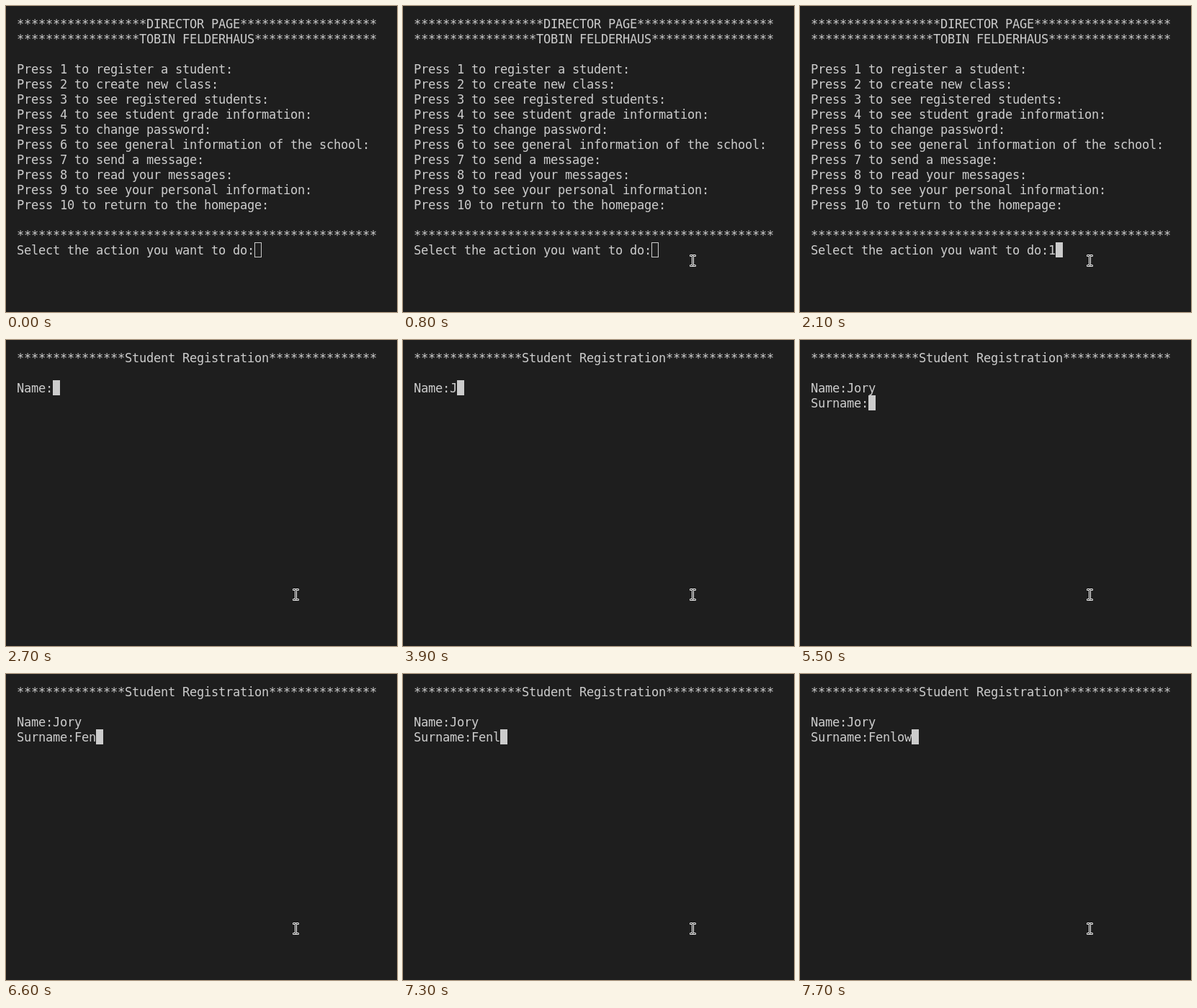
These frames come from a looping animation (543 px wide and 426 px high, 8000 ms). An HTML page:

```html
<!DOCTYPE html>
<html lang="en">
<head>
<meta charset="utf-8">
<title>Terminal session</title>
<style>
  html, body { margin: 0; width: 100%; height: 100%; overflow: hidden; background: #1e1e1e; }
  #screen {
    position: absolute; left: 15px; top: 15px; margin: 0;
    font: 17px/21px "DejaVu Sans Mono", monospace;
    letter-spacing: calc(10px - 1ch);
    color: #ccc; white-space: pre;
  }
  #caret {
    position: absolute; box-sizing: border-box; width: 10px; height: 21px;
    border: 1px solid #ccc;
  }
  #caret.focused { background: #ccc; }
  #pointer { position: absolute; left: 0; top: 0; width: 11px; height: 17px; }
</style>
</head>
<body>
<pre id="screen"></pre>
<div id="caret"></div>
<svg id="pointer" viewBox="0 0 11 17" fill="none">
  <defs>
    <path id="beam" d="M2.5 1.5H4.5L5.5 2.5L6.5 1.5H8.5M2.5 15.5H4.5L5.5 14.5L6.5 15.5H8.5M5.5 2.5V14.5"/>
  </defs>
  <use href="#beam" stroke="#fff" stroke-width="3" stroke-linecap="round" stroke-linejoin="round"/>
  <use href="#beam" stroke="#111" stroke-linecap="square"/>
</svg>
<script>
const LOOP = 8000, CELL_W = 10, CELL_H = 21, LEFT = 15, TOP = 14;
const COLS = 50, FOCUS_AT = 1000;
const screen = document.getElementById('screen');
const caret = document.getElementById('caret');
const pointer = document.getElementById('pointer');

const stars = n => '*'.repeat(n);
const banner = title => {
  const left = Math.floor((COLS - title.length) / 2);
  return stars(left) + title + stars(COLS - left - title.length);
};

const actions = [
  'register a student', 'create new class', 'see registered students',
  'see student grade information', 'change password',
  'see general information of the school', 'send a message',
  'read your messages', 'see your personal information',
  'return to the homepage'
];
const menu = [
  banner('DIRECTOR PAGE'),
  banner('TOBIN FELDERHAUS'),
  '',
  ...actions.map((a, i) => `Press ${i + 1} to ${a}:`),
  '',
  stars(COLS),
  'Select the action you want to do:'
].join('\n');
const form = banner('Student Registration') + '\n\nName:';
const NAME = 'Jory', SURNAME = 'Fenlow';
const named = form + NAME + '\nSurname:';

// [start time, screen text]; the caret always sits after the last character
const typed = (base, word, keys) => keys.map(([t, n]) => [t, base + word.slice(0, n)]);
const screens = [
  [0, menu],
  [2100, menu + '1'],
  [2700, form],
  ...typed(form, NAME, [[3900, 1], [4500, 3], [4800, 4]]),
  [5500, named],
  ...typed(named, SURNAME, [[6200, 1], [6400, 2], [6600, 3], [7300, 4], [7400, 5], [7700, 6]])
];

// [start time, centre x, centre y]
const moves = [
  [300, 236, 325], [400, 330, 338], [500, 420, 352],
  [600, 461, 359], [700, 430, 357], [800, 403, 354]
];

const current = (list, t) => list.filter(step => step[0] <= t).pop();
let shown = '';

function draw(t) {
  const text = current(screens, t)[1];
  if (text !== shown) {
    screen.textContent = shown = text;
    const lines = text.split('\n');
    caret.style.left = LEFT + CELL_W * lines[lines.length - 1].length + 'px';
    caret.style.top = TOP + CELL_H * (lines.length - 1) + 'px';
  }
  caret.className = t >= FOCUS_AT ? 'focused' : '';

  const move = current(moves, t);
  pointer.style.visibility = move ? 'visible' : 'hidden';
  if (move) pointer.style.transform = `translate(${move[1] - 6}px, ${move[2] - 8}px)`;
}

const start = performance.now();
function tick() {
  draw((performance.now() - start) % LOOP);
  requestAnimationFrame(tick);
}
tick();
</script>
</body>
</html>
```
